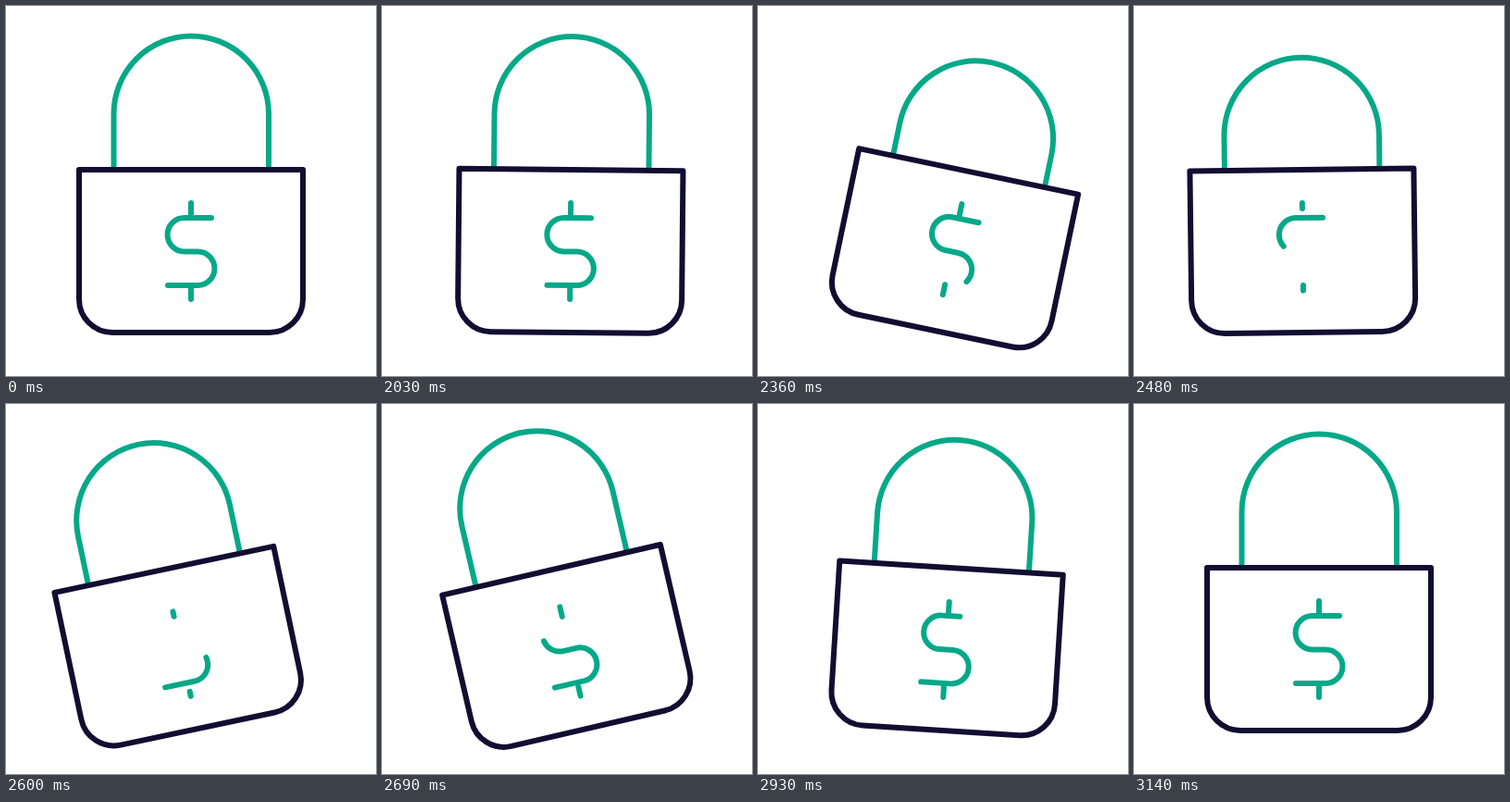
Animation of 400 by 400 pixels, one loop 3.17 s. Source, as an HTML page:

```html
<!DOCTYPE html>
<html lang="en">
<head>
<meta charset="utf-8">
<title>Padlock</title>
<style>
  html, body { margin: 0; width: 100%; height: 100%; overflow: hidden; background: #fff; }
  svg { display: block; width: 100%; height: 100%; }
  path { fill: none; stroke-width: 6; stroke-linejoin: round; stroke-linecap: round; }
  .green { stroke: #05a888; }
  .dark { stroke: #120d31; }
</style>
</head>
<body>
<svg viewBox="0 0 400 400">
  <clipPath id="above"><rect x="0" y="-100" width="400" height="277"/></clipPath>
  <g id="lock">
    <g clip-path="url(#above)">
      <path id="shackle" class="green" d="M116.5 220V116.5a83.75 84 0 0 1 167.5 0V220"/>
    </g>
    <path class="dark" d="M79 177H321V317a36 36 0 0 1-36 36H115a36 36 0 0 1-36-36Z"/>
    <g id="dollar" class="green">
      <path pathLength="1" d="M200 213V229"/>
      <path pathLength="1" d="M222 229H192.8a18.25 18.25 0 0 0 0 36.5H207.2a18.25 18.25 0 0 1 0 36.5H175"/>
      <path pathLength="1" d="M200 302V317"/>
    </g>
  </g>
</svg>
<script>
const LOOP = 3170, REST = 2000, STEP = 30;
const $ = id => document.getElementById(id);
const lock = $('lock'), shackle = $('shackle'), dollar = $('dollar');
const strokes = [...dollar.children];

// Smooth monotone curve through [step, value] keys; turning points are flat.
function track(keys, startSlope = 0, endSlope = 0) {
  const last = keys.length - 1;
  const secant = i => (keys[i + 1][1] - keys[i][1]) / (keys[i + 1][0] - keys[i][0]);
  const slopes = keys.map((_, i) => {
    if (i === 0) return startSlope;
    if (i === last) return endSlope;
    const a = secant(i - 1), b = secant(i);
    return a * b > 0 ? 2 * a * b / (a + b) : 0;
  });
  return x => {
    if (x <= keys[0][0]) return keys[0][1];
    if (x >= keys[last][0]) return keys[last][1];
    const i = keys.findIndex(k => k[0] > x) - 1;
    const [x0, y0] = keys[i], [x1, y1] = keys[i + 1];
    const h = x1 - x0, u = (x - x0) / h, v = 1 - u;
    return y0 + (y1 - y0) * u * u * (3 - 2 * u)
      + h * u * v * (slopes[i] * v - slopes[i + 1] * u);
  };
}

const angle = track([[0, 0], [9, 15.8], [22, -13.8], [30, 3.8], [37, 0]]);
const shift = track([[0, 0], [8.7, 25.2], [17, -19.3], [25, 7], [37, 0]], 3.45);
const drop = track([[0, 0], [11, 24.2], [15, 24.2], [25, -11], [31, 6], [37, 0]]);
const trimEnd = track([[0, 1], [8, 0.93], [16, 0.375], [18, 0]], 0, -0.24);
const trimStart = track([[18, 1], [23, 0.32], [31, 0.05], [36, 0]], -0.18);

function draw(ms) {
  const n = Math.max(0, Math.floor((ms % LOOP - REST) / STEP));
  lock.setAttribute('transform', `translate(${shift(n)} 0) rotate(${angle(n)} 200 265)`);
  shackle.setAttribute('transform', `translate(0 ${drop(n)})`);

  // The sign is erased backwards, then redrawn from its tail.
  const from = n < 18 ? 0 : trimStart(n);
  const to = n < 18 ? trimEnd(n) : 1;
  const whole = to - from > 0.999;
  dollar.setAttribute('visibility', to - from < 0.01 ? 'hidden' : 'visible');
  for (const s of strokes) {
    s.setAttribute('stroke-dasharray', whole ? 'none' : `${to - from} 3`);
    s.setAttribute('stroke-dashoffset', -from);
  }
}

const begin = performance.now();
function tick() {
  draw(performance.now() - begin);
  requestAnimationFrame(tick);
}
tick();
</script>
</body>
</html>
```
